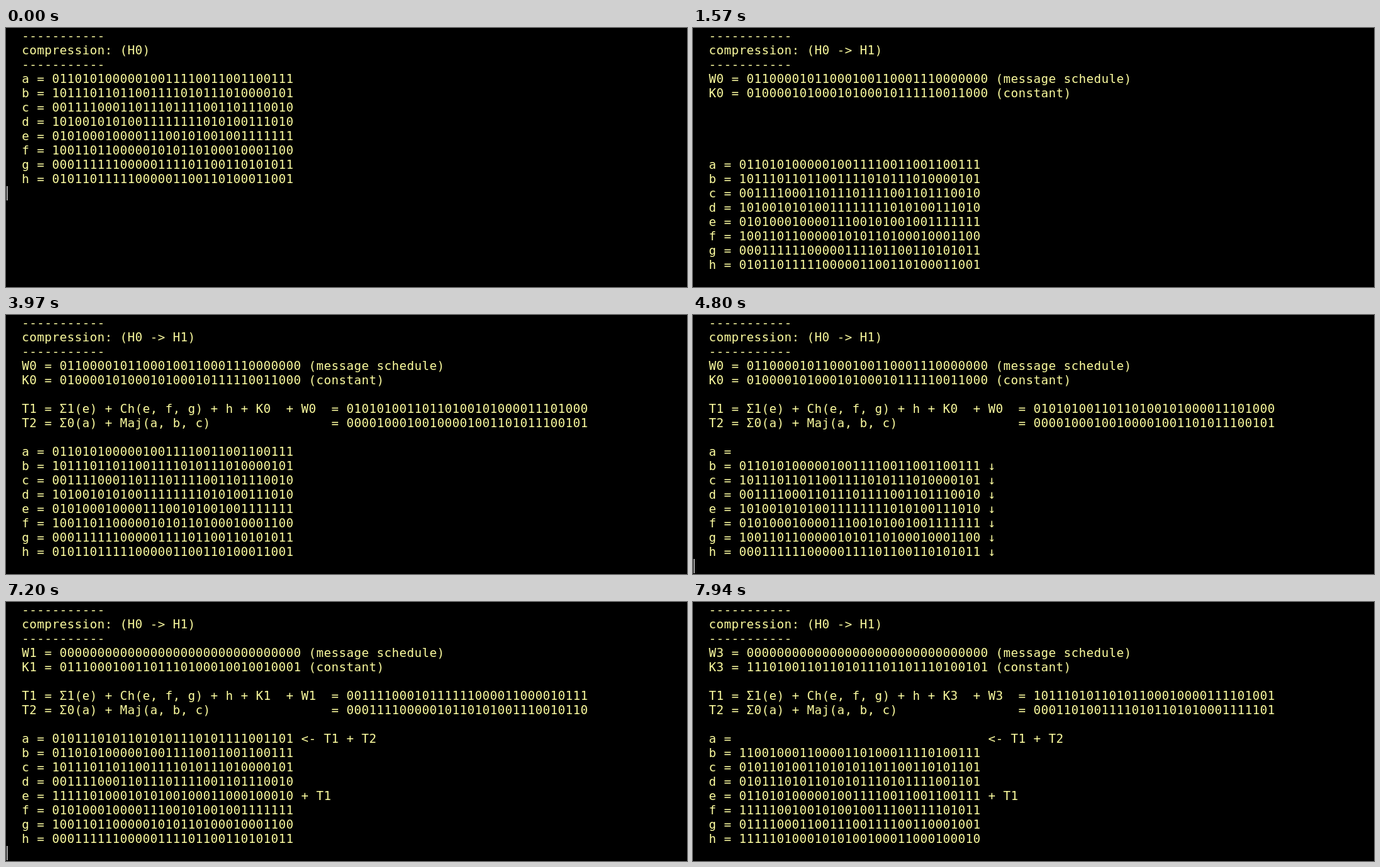
These frames come from a looping animation (902x344 px, 8 s). An HTML page:

```html
<!DOCTYPE html>
<html lang="en">
<head>
<meta charset="utf-8">
<title>SHA-256 compression</title>
<style>
  html, body { margin: 0; width: 100%; height: 100%; overflow: hidden; background: #000; }
  svg { display: block; width: 902px; height: 344px; }
  text { font: 16px "DejaVu Sans Mono", monospace; fill: #ffffa0; white-space: pre; }
</style>
</head>
<body>
<svg id="stage" viewBox="0 0 902 344">
  <rect width="902" height="344" fill="#000"/>
  <g id="lines"></g>
  <rect id="cursor" x="1" width="1" height="19" fill="#fff"/>
</svg>
<script>
const LOOP = 8000, CELL = 10, ROW = 19, LEFT = 21, TOP = 1, ASCENT = 15, ROWS = 18;
const NAMES = 'abcdefgh';

// --- SHA-256 rounds for the message "abc" ---
const H0 = [0x6a09e667, 0xbb67ae85, 0x3c6ef372, 0xa54ff53a,
            0x510e527f, 0x9b05688c, 0x1f83d9ab, 0x5be0cd19];
const K = [0x428a2f98, 0x71374491, 0xb5c0fbcf, 0xe9b5dba5];
const W = [0x61626380, 0, 0, 0];

const rotr = (x, n) => (x >>> n) | (x << (32 - n));
const sigma = (x, p, q, r) => rotr(x, p) ^ rotr(x, q) ^ rotr(x, r);
const bits = x => (x >>> 0).toString(2).padStart(32, '0');

const rounds = [];
let state = H0;
for (let i = 0; i < K.length; i++) {
  const [a, b, c, d, e, f, g, h] = state;
  const t1 = (sigma(e, 6, 11, 25) + ((e & f) ^ (~e & g)) + h + K[i] + W[i]) >>> 0;
  const t2 = (sigma(a, 2, 13, 22) + ((a & b) ^ (a & c) ^ (b & c))) >>> 0;
  const shifted = [null, a, b, c, d, e, f, g];
  const after = [(t1 + t2) >>> 0, a, b, c, (d + t1) >>> 0, e, f, g];
  rounds.push({ t1, t2, before: state, shifted, after });
  state = after;
}

// --- Screen text at time t ---
function registers(values, notes = {}) {
  return [...NAMES].map((name, i) => {
    const value = values[i] === null ? ' '.repeat(32) : bits(values[i]);
    return `${name} = ${value} ${notes[i] || ''}`;
  });
}

function arrows(first, last) {
  const notes = {};
  for (let i = first; i <= last; i++) notes[i] = '↓';
  return notes;
}

const wLine = i => `W${i} = ${bits(W[i])} (message schedule)`;
const kLine = i => `K${i} = ${bits(K[i])} (constant)`;
const t1Line = i => `T1 = Σ1(e) + Ch(e, f, g) + h + K${i}  + W${i}`;
const t2Line = 'T2 = Σ0(a) + Maj(a, b, c)';
const result = (label, value) => label.padEnd(41) + '= ' + bits(value);

function firstRound(t) {
  const { t1, t2, before, shifted, after } = rounds[0];
  let values = before, notes = {};
  if (t >= 4400) notes = arrows(0, 6);
  if (t >= 4800) { values = [...shifted]; notes = arrows(1, 7); }
  if (t >= 5200) notes = { 0: '<- T1 + T2' };
  if (t >= 5600) values[0] = after[0];
  if (t >= 6000) notes[4] = '+ T1';
  if (t >= 6400) values[4] = after[4];
  return [
    t >= 1170 ? wLine(0) : '',
    t >= 1570 ? kLine(0) : '',
    '',
    t >= 2770 ? result(t1Line(0), t1) : t >= 2370 ? t1Line(0) : '',
    t >= 3570 ? result(t2Line, t2) : t >= 3170 ? t2Line : '',
    '',
    ...registers(values, notes)
  ];
}

function fastRound(i, stage) {
  const { t1, t2 } = rounds[i];
  return [
    wLine(i), kLine(i), '',
    result(t1Line(i), t1), result(t2Line, t2), '',
    ...registers(rounds[i][stage], { 0: '<- T1 + T2', 4: '+ T1' })
  ];
}

// Start, shift and fill of each quick round
const FAST = [7200, 7300, 7400, 7500, 7640, 7740, 7840, 7940];
const STAGES = ['before', 'shifted', 'after'];

function screen(t) {
  const dashes = '-'.repeat(11);
  const head = [dashes, `compression: (H0${t >= 400 ? ' -> H1' : ''})`, dashes];
  if (t < 770) return [...head, ...registers(H0)];
  const step = FAST.filter(at => t >= at).length - 1;
  const body = step < 0 ? firstRound(t)
    : fastRound(1 + Math.floor(step / 3), STAGES[step % 3]);
  return [...head, ...body];
}

// The cursor blinks every 600 ms; one switch waits for the redraw at 5200
function cursorOn(t) {
  return Math.floor((t + 230) / 600) % 2 === 0 || (t >= 5170 && t < 5200);
}

// --- Drawing ---
const SVG = 'http://www.w3.org/2000/svg';
const cursor = document.getElementById('cursor');
const lines = Array.from({ length: ROWS }, (_, row) => {
  const el = document.createElementNS(SVG, 'text');
  el.setAttribute('y', TOP + ASCENT + row * ROW);
  return document.getElementById('lines').appendChild(el);
});

// Every character sits on the terminal grid
function setLine(el, text) {
  const shown = text.trimEnd().replace(/ /g, '\u00a0');
  if (el.textContent === shown) return;
  el.setAttribute('x', Array.from(shown, (_, i) => LEFT + i * CELL).join(' '));
  el.textContent = shown;
}

function draw(t) {
  const text = screen(t);
  lines.forEach((el, row) => setLine(el, text[row] || ''));
  cursor.setAttribute('y', TOP + text.length * ROW);
  cursor.setAttribute('visibility', cursorOn(t) ? 'visible' : 'hidden');
}

const start = performance.now();
function tick() {
  draw((performance.now() - start) % LOOP);
  requestAnimationFrame(tick);
}
tick();
</script>
</body>
</html>
```
